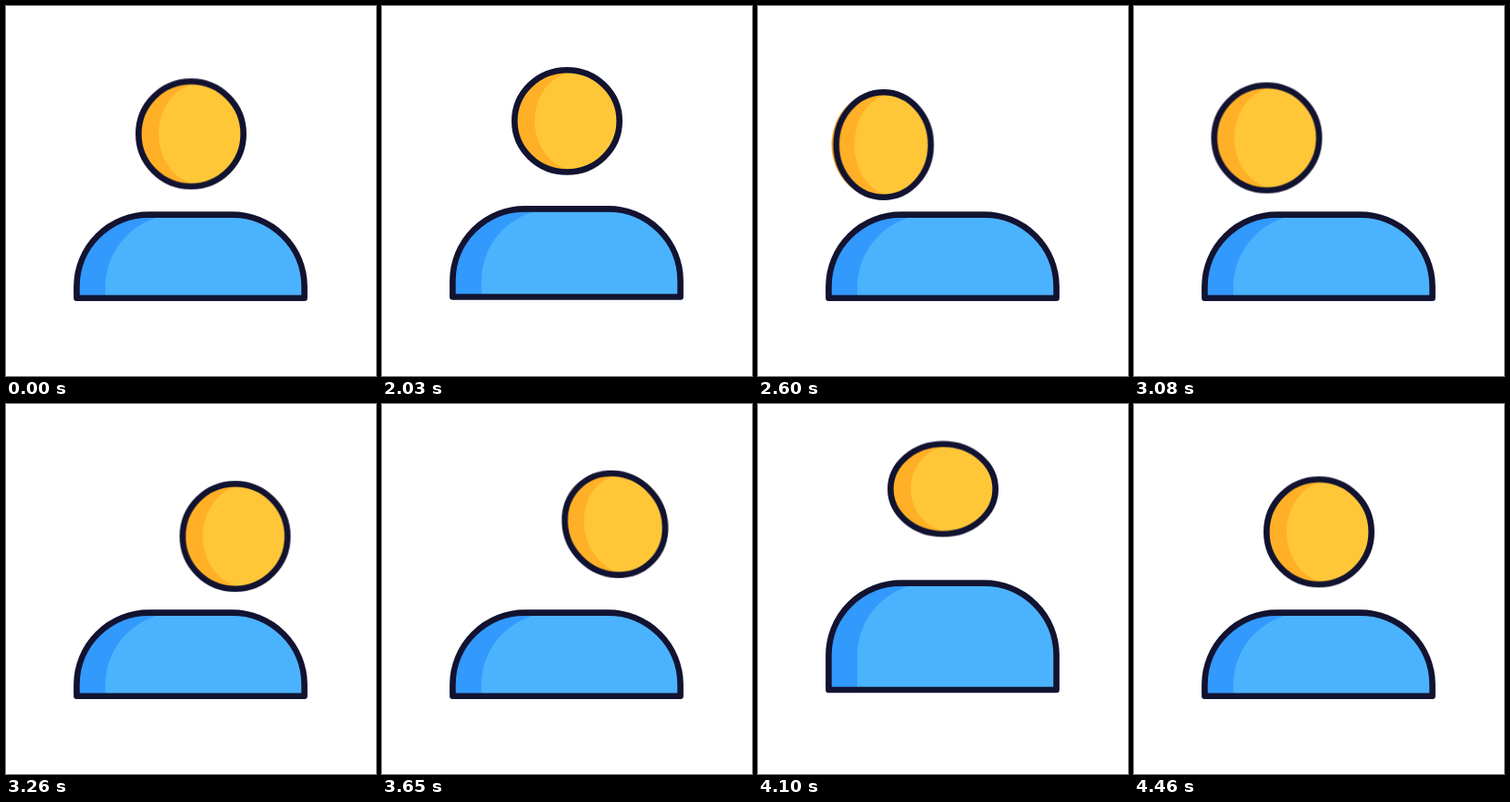
These frames come from a looping animation (400 px wide and 400 px high, 4.55 s). An HTML page without scripts:

```html
<!DOCTYPE html>
<html lang="en">
<head>
<meta charset="utf-8">
<title>Bouncing user icon</title>
<style>
  :root {
    --body: path("M76.4 315.8V303A78 78 0 0 1 154.4 225.6H244.6A78 78 0 0 1 322.6 303V315.8Z");
    --body-up: path("M76.4 309V271A78 78 0 0 1 154.4 193.4H244.6A78 78 0 0 1 322.6 271V309Z");
    --light: path("M107.4 315.8V303A78 78 0 0 1 185.4 225.6H244.6A78 78 0 0 1 322.6 303V315.8Z");
    --light-up: path("M107.4 309V271A78 78 0 0 1 185.4 193.4H244.6A78 78 0 0 1 322.6 271V309Z");
    --swing: cubic-bezier(.6, 0, .4, 1);
    --launch: cubic-bezier(.25, .5, .5, 1);
    --rise: cubic-bezier(.3, .1, .4, 1);
  }
  html, body { margin: 0; width: 100%; height: 100%; overflow: hidden; background: #fff; }
  svg { display: block; width: 100vw; height: 100vh; }

  .outline { fill: none; stroke: #121331; stroke-width: 6.6; stroke-linejoin: round; vector-effect: non-scaling-stroke; }
  .body { --low: var(--body); --high: var(--body-up); }
  .light { --low: var(--light); --high: var(--light-up); }

  .body, .light, .sway, .hop, .squash, .shade { animation: stretch 4550ms linear infinite; }
  .sway { animation-name: sway; animation-timing-function: var(--swing); }
  .hop { animation-name: hop; animation-timing-function: ease-in-out; }
  .squash { animation-name: squash; }
  .shade { animation-name: spill; }

  @keyframes stretch {
    0%, 44%, 53.5%, 82%, 94%, 100% { d: var(--low); }
    47.3%, 49.2%, 89.5%, 90.1% { d: var(--high); }
  }

  /* Centre, left shoulder, right shoulder, centre */
  @keyframes sway {
    0%, 47.5%, 86.2%, 100% { transform: none; }
    56.5% { transform: translateX(-64.5px); }
    59.8%, 66.6% { transform: translateX(-60px); }
    73.6%, 77.6% { transform: translateX(60px); }
  }

  @keyframes hop {
    0%, 70.1%, 98%, 100% { transform: none; }
    44% { transform: none; animation-timing-function: var(--launch); }
    47.3%, 49% { transform: translateY(-50px); }
    56.5%, 64.4%, 73.6% { transform: translateY(11.7px); }
    77.6% { transform: translateY(11.7px); animation-timing-function: var(--rise); }
    89.5%, 90.1% { transform: translateY(-46.5px); }
    94% { transform: translateY(1.5px); }
  }

  /* Flat at the top, narrow on landing, slanted on take-off */
  @keyframes squash {
    0%, 44%, 53%, 59.8%, 77.6%, 94%, 100% { transform: matrix(1, 0, 0, 1, 0, 0); }
    47.3%, 49%, 89.5%, 90.1% { transform: matrix(1, 0, 0, .857, 0, 0); }
    57.1% { transform: matrix(.9, 0, 0, 1, 0, 0); }
    80.2% { transform: matrix(.957, .035, .035, .968, 0, 0); }
  }

  /* The shaded side lags behind the outline on landing */
  @keyframes spill {
    0%, 55%, 59.8%, 100% { transform: none; }
    57.1% { transform: translateX(-6px); }
  }
</style>
</head>
<body>
<svg viewBox="0 0 400 400">
  <path class="body" fill="#3299fd"/>
  <path class="light" fill="#4bb3fd"/>
  <path class="body outline"/>
  <g transform="translate(200 138.3)">
    <g class="sway"><g class="hop"><g class="squash">
      <circle class="shade" r="56.5" fill="#ffb027"/>
      <path fill="#ffc738" d="M12 -55.2A47 55.2 0 0 0 12 55.2A56.5 56.5 0 0 0 12 -55.2Z"/>
      <circle class="outline" r="56.7"/>
    </g></g></g>
  </g>
</svg>
</body>
</html>
```
